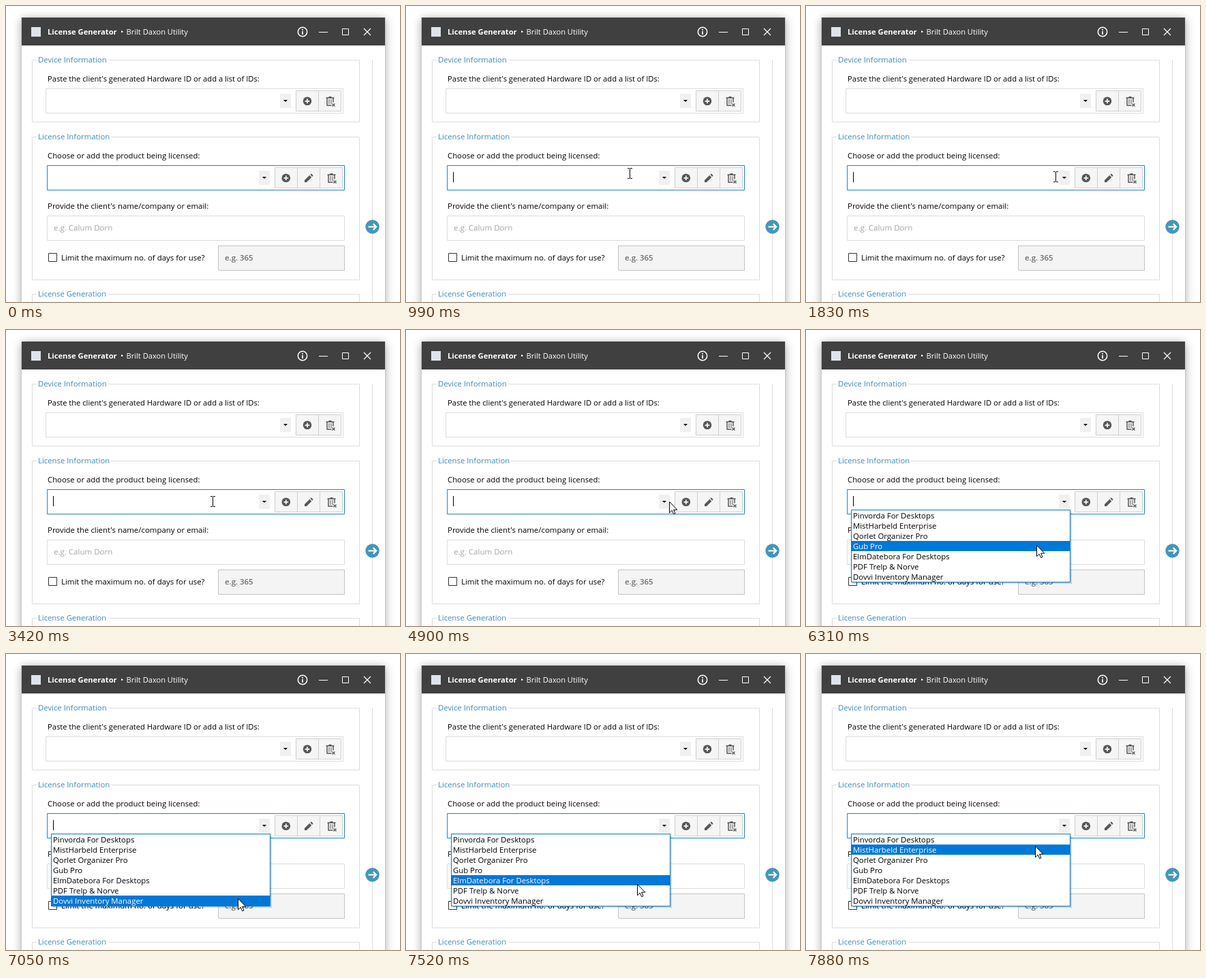
These frames come from a looping animation (578 by 435 pixels, 8 s). An HTML page:

```html
<!DOCTYPE html>
<html lang="en">
<head>
<meta charset="utf-8">
<title>License Generator</title>
<style>
html, body { margin: 0; width: 100%; height: 100%; overflow: hidden; background: #fff; }
#stage { position: relative; width: 578px; height: 435px; overflow: hidden; }
#win { position: absolute; left: 23px; top: 17px; width: 533px; height: 440px; background: #fff;
  box-shadow: 0 2px 13px rgba(0,0,0,.36), 0 0 1px rgba(0,0,0,.35); }
svg { position: absolute; left: 0; top: 0; }
text { font: 11.35px "Open Sans", "Noto Sans", sans-serif; fill: #000; white-space: pre; }
.head { fill: #3c8cb0; }
.btn { fill: #f5f5f5; stroke: #cfcfcf; }
.box { fill: #fff; stroke: #dcdcdc; }
.frame { fill: none; stroke: #dcdcdc; }
.icon { fill: #57575b; }
.line { fill: none; stroke: #57575b; }
.white { fill: none; stroke: #fff; }
</style>
</head>
<body>
<div id="stage">
<div id="win"></div>
<svg width="578" height="435" viewBox="0 0 578 435">
  <defs>
    <g id="plus">
      <circle class="icon" r="6.3"/>
      <path d="M-3.3 0H3.3M0-3.3V3.3" stroke="#f5f5f5" stroke-width="1.8"/>
    </g>
    <g id="trash">
      <path class="line" stroke-width="1.5" d="M-6-5H6M-2-6.2H2M-4.5-5V6H2M4.5-5V1.5"/>
      <path class="line" d="M-1.5-3V4M1.5-3V4"/>
      <path class="line" stroke-width="1.3" d="M3 3.5L7 7.5M7 3.5L3 7.5"/>
    </g>
    <g id="drop">
      <path fill="#f0f0f0" d="M0 0H16V21H0Z"/>
      <path d="M5 9H11L8 12Z"/>
    </g>
    <path id="arrow" d="M.5.5V16.8L4.2 13.2L6.7 18.7L9 17.7L6.6 12.2H11.8Z" fill="#fff" stroke="#000"/>
    <path id="beam" d="M-3-7.5H0M1-7.5H4M-3 7.5H0M1 7.5H4M.5-7V7" fill="none" stroke="#000"/>
  </defs>

  <!-- title bar -->
  <path fill="#404040" d="M23 17H556V58H23Z"/>
  <path fill="#dfe4ea" d="M37 31H51V45H37Z"/>
  <text x="61" y="42" style="font-weight:700;font-size:11.2px;fill:#fff">License Generator</text>
  <text x="168" y="42" style="fill:#fff">•</text>
  <text x="176.5" y="42" style="font-size:11.1px;fill:#fff">Brilt Daxon Utility</text>
  <circle class="white" cx="435" cy="38" r="6.7" stroke-width="1.5"/>
  <path class="white" stroke-width="1.7" d="M435 34V35.7M435 37V42"/>
  <path class="white" d="M459 38.5H472M493.5 33.5H502.5V42.5H493.5Z"/>
  <path class="white" stroke-width="1.2" d="M525 33L535 43M535 33L525 43"/>

  <!-- groups -->
  <path class="frame" d="M45 79.5H38.5V170.5H518.5V79.5H150"/>
  <path class="frame" d="M45 192.5H38.5V402.5H518.5V192.5H154"/>
  <path class="frame" d="M45 423.5H38.5V440M150 423.5H518.5V440"/>
  <path class="frame" d="M537.5 79V435"/>
  <text class="head" x="47" y="83">Device Information</text>
  <text class="head" x="47" y="196">License Information</text>
  <text class="head" x="47" y="427" style="font-size:11.2px">License Generation</text>

  <!-- device -->
  <text x="61" y="111" style="font-size:11.17px">Paste the client's generated Hardware ID or add a list of IDs:</text>
  <path class="box" d="M58.5 121.5H494.5V157.5H58.5Z"/>
  <use href="#drop" x="402" y="129"/>
  <path class="btn" d="M425.5 124.5H491.5V154.5H425.5ZM458.5 124.5V154.5"/>
  <use href="#plus" x="442" y="139.8"/>
  <use href="#trash" x="475.5" y="140"/>

  <!-- product -->
  <text x="61" y="224">Choose or add the product being licensed:</text>
  <path d="M60.5 234.5H496.5V270.5H60.5Z" fill="#fff" stroke="#1883d7"/>
  <use href="#drop" x="371" y="242"/>
  <path class="btn" d="M394.5 237.5H493.5V267.5H394.5ZM427.5 237.5V267.5M460.5 237.5V267.5"/>
  <use href="#plus" x="410.8" y="252.8"/>
  <path class="icon" d="M438 259V256L445.3 248.7L448.3 251.7L441 259ZM446.3 247.7L447.8 246.3L450.7 249.2L449.3 250.7Z"/>
  <use href="#trash" x="477.5" y="253"/>

  <!-- client -->
  <text x="61" y="298" style="font-size:11.43px">Provide the client's name/company or email:</text>
  <path class="box" d="M60.5 308.5H496.5V344.5H60.5Z"/>
  <text x="70" y="330" style="font-size:11.5px;fill:#a3a3a3">e.g. Calum Dorn</text>
  <path d="M62.5 363.5H74.5V375.5H62.5Z" fill="#fff" stroke="#333"/>
  <text x="81" y="374" style="font-size:11.45px">Limit the maximum no. of days for use?</text>
  <path d="M311.5 352.5H496.5V388.5H311.5Z" fill="#f4f4f4" stroke="#c3c3c3"/>
  <text x="321" y="374" style="font-size:11.4px;font-weight:600;fill:#6d6d6d">e.g. 365</text>

  <circle cx="537.5" cy="324.5" r="10.2" fill="#4297b7"/>
  <path class="white" stroke-width="2" d="M531.5 324.5H543M538.7 320L543.2 324.5L538.7 329"/>

  <path id="caret" d="M69 244H70V259H69Z"/>
  <g id="popup">
    <path d="M69 267H390V373H69Z" fill="#000" opacity=".16"/>
    <path d="M66.5 264.5H387.5V370.5H66.5Z" fill="#fff" stroke="#0078d7"/>
    <rect id="hover" x="67" width="320" height="15" fill="#0078d7"/>
  </g>
  <use id="cursor"/>
</svg>
</div>
<script>
const LOOP = 8000, TOP = 265, ROW = 15, OPEN = 5180, SLIDE = 200;
const $ = id => document.getElementById(id);
const products = ["Pinvorda For Desktops", "MistHarbeld Enterprise", "Qorlet Organizer Pro", "Gub Pro",
  "ElmDatebora For Desktops", "PDF Trelp & Norve", "Dovvi Inventory Manager"];

const rows = products.map((name, i) => {
  const row = document.createElementNS("http://www.w3.org/2000/svg", "text");
  row.setAttribute("x", 69);
  row.setAttribute("y", TOP + 12 + i * ROW);
  row.textContent = name;
  return $("popup").appendChild(row);
});

// Bursts of pointer movement: start, end, number of steps
const bursts = [[160, 810, 8], [990, 990, 1], [1170, 1650, 6], [1830, 2580, 9], [2660, 2660, 1],
  [4350, 4900, 7], [5080, 5480, 5], [5650, 6390, 9], [6490, 7050, 7], [7420, 7880, 6]];
const ticks = bursts.flatMap(([a, b, n]) =>
  Array.from({ length: n }, (_, i) => Math.round(a + (b - a) * i / Math.max(1, n - 1))));

// Pointer path: time, x, y
const path = [[160, 432, 428], [440, 400, 350], [630, 352, 268], [720, 339, 256], [810, 344, 253],
  [990, 328, 246], [1170, 332, 248], [1400, 371, 249], [1650, 367, 250], [1830, 366, 251],
  [2100, 380, 251], [2300, 350, 251], [2580, 304, 252], [2660, 303, 252], [4350, 306, 253],
  [4600, 350, 258], [4750, 387, 262], [4900, 386, 252], [5080, 385, 254], [5480, 375, 259],
  [5650, 373, 260], [5900, 358, 285], [6290, 338, 316], [6310, 338, 316], [6390, 337, 321],
  [6490, 337, 325], [6900, 340, 355], [7050, 340, 359], [7420, 340, 352], [7880, 336, 282]];

const caretOn = [[990, 2860], [3420, 3970], [4530, 5080], [5830, 6390], [6940, 7450]];

function pointerAt(t) {
  const i = path.findIndex(p => p[0] >= t);
  if (i <= 0) return path[0].slice(1);
  const [t0, x0, y0] = path[i - 1], [t1, x1, y1] = path[i];
  const k = (t - t0) / (t1 - t0);
  return [Math.round(x0 + (x1 - x0) * k), Math.round(y0 + (y1 - y0) * k)];
}

const show = (el, on) => el.setAttribute("visibility", on ? "visible" : "hidden");

function draw(t) {
  const step = ticks.filter(v => v <= t).pop();
  const moving = step !== undefined;
  const open = moving && step > OPEN;
  show($("caret"), caretOn.some(([a, b]) => t >= a && t < b));
  show($("cursor"), moving);
  $("popup").style.display = open ? "" : "none";
  if (!moving) return;

  const [x, y] = pointerAt(step);
  const overText = (x < 371 && y >= 235 && y <= 270) || (x < 496 && y >= 309 && y <= 344);
  $("cursor").setAttribute("href", overText && !open ? "#beam" : "#arrow");
  $("cursor").setAttribute("x", x);
  $("cursor").setAttribute("y", y);
  if (!open) return;

  const shown = Math.min(1, (step - OPEN) / SLIDE);
  $("popup").style.clipPath = shown < 1 ? `inset(0 0 ${Math.round(109 * (1 - shown))}px 0)` : "none";
  const active = Math.floor((y - TOP) / ROW);
  show($("hover"), active >= 0);
  $("hover").setAttribute("y", TOP + active * ROW);
  rows.forEach((row, i) => row.style.fill = i === active ? "#fff" : "#000");
}

function frame() {
  draw(performance.now() % LOOP);
  requestAnimationFrame(frame);
}
frame();
</script>
</body>
</html>
```
